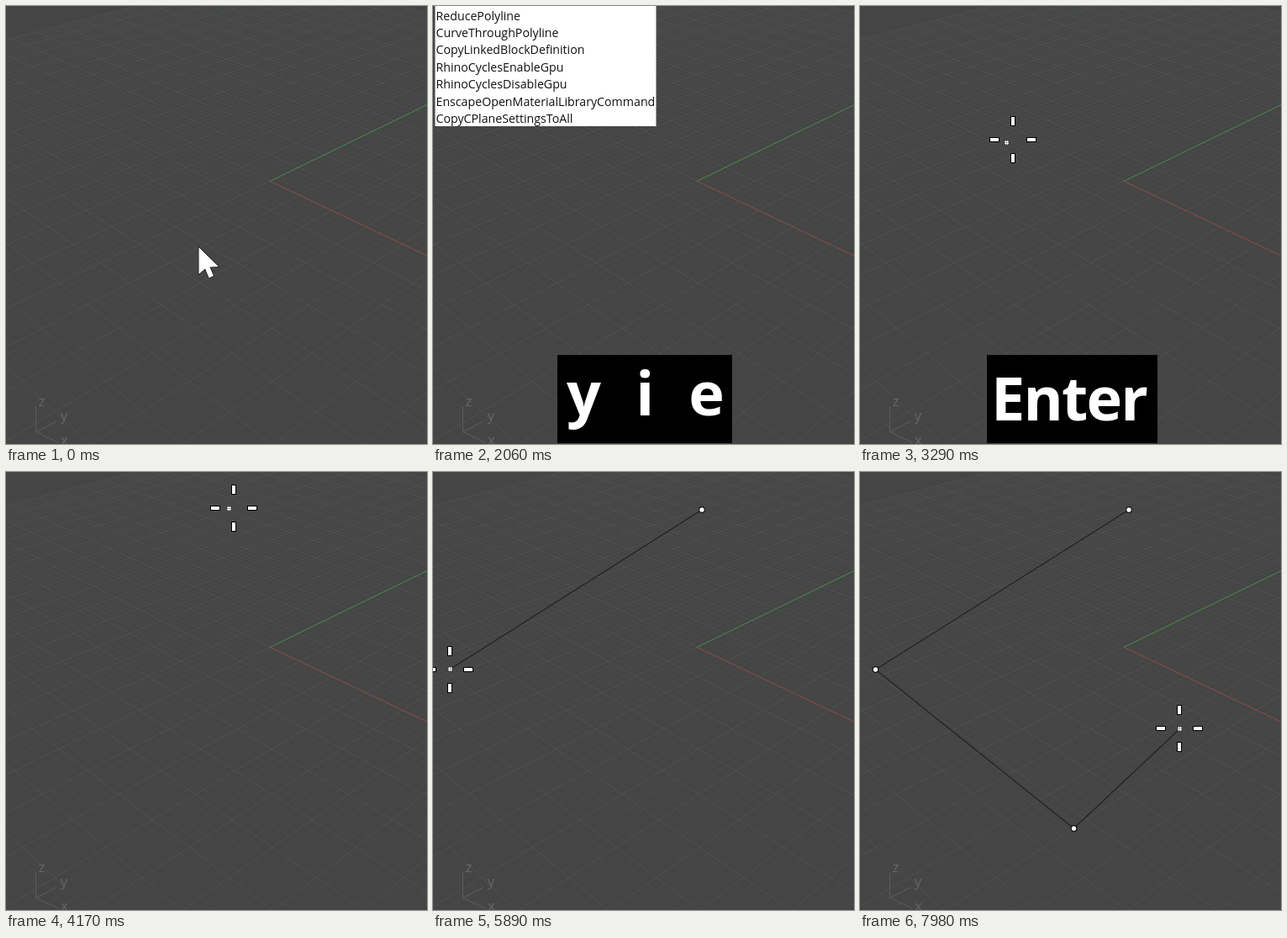
An HTML page with a canvas that plays this animation: 501 by 521 pixels, repeating every 8 s.

```html
<!DOCTYPE html>
<html lang="en">
<head>
<meta charset="utf-8">
<title>Drawing a polyline</title>
<style>
html, body { margin: 0; width: 100%; height: 100%; overflow: hidden; background: #454545; }
canvas { display: block; }
</style>
</head>
<body>
<canvas id="stage" width="501" height="521"></canvas>
<script>
const W = 501, H = 521, LOOP = 8000;
const ctx = document.getElementById('stage').getContext('2d');
const SANS = '"Open Sans", "Noto Sans", sans-serif';

const linear = p => p;
const smooth = p => p * p * (3 - 2 * p);
const easeOut = p => 1 - (1 - p) ** 3;

// Keys held down, from each time on
const KEYS = [
  [0, ''], [990, 'p o'], [1190, 'p o l'], [1460, 'p o y'], [1660, 'p o y l'],
  [1920, 'p o y l i'], [1990, 'y i n e'], [2060, 'y i e'], [2400, 'e'],
  [2550, 'e Enter'], [2950, 'Enter'], [3515, '']
];

const COMMANDS = [
  'ReducePolyline', 'CurveThroughPolyline', 'CopyLinkedBlockDefinition',
  'RhinoCyclesEnableGpu', 'RhinoCyclesDisableGpu',
  'EnscapeOpenMaterialLibraryCommand', 'CopyCPlaneSettingsToAll'
];

// Mouse strokes: each a Bezier curve followed in a number of screen updates
const STROKES = [
  { start: 3150, end: 3890, updates: 11, ease: linear, curve: [[103, 179], [256, 163], [300, 44], [250, 44]] },
  { start: 4030, end: 4770, updates: 12, ease: smooth, curve: [[247, 44], [340, 41], [410, 43], [330, 44]] },
  { start: 4890, end: 5690, updates: 13, ease: smooth, curve: [[331, 44], [329, 29], [100, 180], [22, 234]] },
  { start: 5770, end: 5960, updates: 3, ease: linear, curve: [[21, 234], [20, 234], [19, 235], [18, 235]] },
  { start: 6290, end: 7040, updates: 11, ease: easeOut, curve: [[20, 233], [100, 288], [165, 334], [255, 425]] },
  { start: 7240, end: 7980, updates: 11, ease: smooth, curve: [[256, 427], [330, 370], [430, 300], [380, 305]] }
];

const CORNERS = [
  { time: 5085, x: 320, y: 45 },
  { time: 6290, x: 18.5, y: 235 },
  { time: 7240, x: 254.5, y: 424 }
];
const LAG = 18;

function strokePath(c, points, color, width = 1, close = false) {
  c.beginPath();
  points.forEach(([x, y]) => c.lineTo(x, y));
  if (close) c.closePath();
  c.strokeStyle = color;
  c.lineWidth = width;
  c.stroke();
}

// Ground plane in perspective, u along the red axis and v along the green one
function ground(u, v) {
  const w = 1 - u + v;
  return [(314.5 + 810 * u + 1427 * v) / w, (208 + 330 * u - 330 * v) / w];
}

function drawGrid(c) {
  const lines = 70, reach = 0.43;
  for (let i = -lines; i <= lines; i++) {
    const s = reach * i / lines;
    const color = i % 5 ? 'rgba(118,126,130,0.07)' : 'rgba(124,130,133,0.16)';
    strokePath(c, [ground(s, -reach), ground(s, reach)], color);
    strokePath(c, [ground(-reach, s), ground(reach, s)], color);
  }
}

function drawAxisIcon(c) {
  strokePath(c, [[35.5, 476], [35.5, 506.5], [60, 494]], '#5c5c5c');
  strokePath(c, [[35.5, 506.5], [62, 519]], '#5c5c5c');
  c.font = '17px ' + SANS;
  c.fillStyle = '#666';
  c.textAlign = 'center';
  c.fillText('z', 42.5, 476);
  c.fillText('y', 69, 493);
  c.fillText('x', 69.5, 522);
}

function makeScene() {
  const canvas = document.createElement('canvas');
  canvas.width = W;
  canvas.height = H;
  const c = canvas.getContext('2d');
  c.fillStyle = '#454545';
  c.fillRect(0, 0, W, H);
  drawGrid(c);
  strokePath(c, [[314, 208.5], [501, 297]], '#8a4848');
  strokePath(c, [[314, 208.5], [501, 117.5]], '#4a874b');
  drawAxisIcon(c);
  return canvas;
}

function drawPointer() {
  const shape = [
    [229.5, 287], [229.5, 319], [237, 312.5], [241.5, 323.5],
    [247, 321], [242.5, 310.5], [253, 310]
  ];
  strokePath(ctx, shape, '#000', 1.2, true);
  ctx.fillStyle = '#fff';
  ctx.fill();
}

function drawCommands() {
  ctx.fillStyle = '#fff';
  ctx.fillRect(2.5, 0, 263, 143);
  ctx.fillStyle = '#111';
  ctx.font = '14.2px ' + SANS;
  COMMANDS.forEach((name, i) => ctx.fillText(name, 3.5, 16.5 + 20.45 * i));
}

function drawKeys(label) {
  if (!label) return;
  const gap = 43;
  ctx.font = 'bold 72px ' + SANS;
  ctx.letterSpacing = '-1.8px';
  const keys = label.split(' ').map(text => ({ text, m: ctx.measureText(text) }));
  let end = 0, right = 0, up = 0, down = 0;
  for (const key of keys) {
    key.x = end;
    right = end + key.m.actualBoundingBoxRight;
    end += key.m.width + gap;
    up = Math.max(up, key.m.actualBoundingBoxAscent);
    down = Math.max(down, key.m.actualBoundingBoxDescent);
  }
  const left = -keys[0].m.actualBoundingBoxLeft;
  const width = Math.round(right - left + 23);
  const boxX = Math.floor(252.8 - width / 2);
  ctx.fillStyle = '#000';
  ctx.fillRect(boxX, 415, width, 105);
  ctx.fillStyle = '#fff';
  const base = Math.round(467.5 + (up - down) / 2);
  for (const key of keys) ctx.fillText(key.text, boxX + 11 - left + key.x, base);
  ctx.letterSpacing = '0px';
}

function bezier(points, s) {
  const r = 1 - s;
  const weights = [r * r * r, 3 * r * r * s, 3 * r * s * s, s * s * s];
  return [0, 1].map(axis => points.reduce((sum, p, i) => sum + p[axis] * weights[i], 0));
}

function drawCorner({ x, y }) {
  ctx.beginPath();
  ctx.arc(x, y, 3.3, 0, Math.PI * 2);
  ctx.fillStyle = '#fff';
  ctx.fill();
  ctx.strokeStyle = '#111';
  ctx.lineWidth = 1.2;
  ctx.stroke();
}

function drawTracker(x, y) {
  ctx.fillStyle = '#333';
  ctx.fillRect(x - 2, y - 2, 5, 5);
  ctx.fillStyle = '#fff';
  for (const d of [-1, 1]) {
    ctx.fillRect(x + d, y - 2, 1, 5);
    ctx.fillRect(x - 2, y + d, 5, 1);
  }
}

function drawBar(x, y, w, h) {
  ctx.fillStyle = '#000';
  ctx.fillRect(x - w / 2, y - h / 2, w, h);
  ctx.fillStyle = '#fff';
  ctx.fillRect(x - w / 2 + 1, y - h / 2 + 1, w - 2, h - 2);
}

function drawCrosshair(x, y) {
  for (const d of [-22, 22]) {
    drawBar(x, y + d, 6, 12);
    drawBar(x + d, y, 12, 6);
  }
}

function drawPolyline(t) {
  const { start, end, updates, ease, curve } = STROKES.filter(s => s.start <= t).pop();
  const span = end - start, step = span / (updates - 1);
  const elapsed = step * Math.min(updates - 1, Math.floor((t - start + 10) / step));
  const at = ms => bezier(curve, ease(Math.max(0, ms / span))).map(Math.round);
  const [x, y] = at(elapsed);
  const [px, py] = at(elapsed - LAG);
  const corners = CORNERS.filter(c => c.time <= t);
  if (corners.length) {
    strokePath(ctx, [...corners.map(c => [c.x, c.y]), [px + 0.5, py + 0.5]], '#202020', 1.1);
  }
  corners.forEach(drawCorner);
  drawTracker(px, py);
  drawCrosshair(x, y);
}

const scene = makeScene();

function render(t) {
  ctx.drawImage(scene, 0, 0);
  if (t < 1190 || (t >= 1260 && t < 1660)) drawPointer();
  if (t >= 1920 && t < 2550) drawCommands();
  drawKeys(KEYS.filter(k => k[0] <= t).pop()[1]);
  if (t >= STROKES[0].start) drawPolyline(t);
}

const begin = performance.now();
function frame() {
  render((performance.now() - begin) % LOOP);
  requestAnimationFrame(frame);
}
frame();
</script>
</body>
</html>
```
